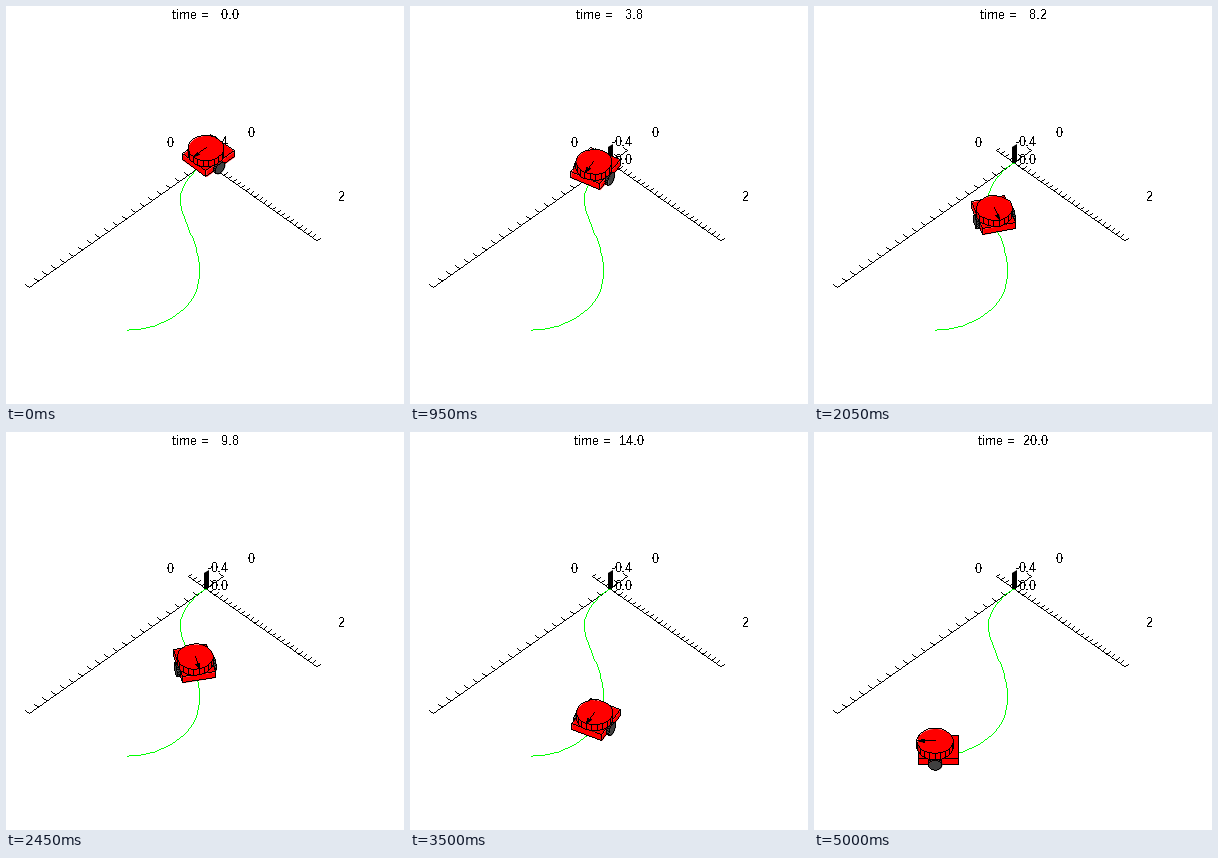
These frames come from a looping animation (398 by 398 pixels, 5050 ms). A matplotlib script:

```python
import numpy as np
import matplotlib.pyplot as plt
from matplotlib.animation import FuncAnimation
from matplotlib.collections import PolyCollection

plt.rcParams.update({"font.family": "Liberation Sans", "text.antialiased": False,
                     "text.hinting": "native", "text.hinting_factor": 1})

SIZE, DPI = 398, 100
FRAMES, INTERVAL, DT = 101, 50, 0.2
ORIGIN = np.array([200.0, 157.0])
H, V, Z = 44.2, 31.0, 45.0          # pixels per unit on screen
RED, GREY, GREEN, BLACK = "#ff0000", "#404040", "#00ff00", "#000000"

# screen points passed at equal time steps, and the speeds at both ends
KEYS = np.array([(200, 157), (186.6, 167.6), (174.5, 197.6), (190.1, 242.5),
                 (188.8, 288.2), (157.7, 316), (121, 324)])
V_START, V_END = (-0.7, 0.49), (-10.6, 0.0)
STEP = (FRAMES - 1) * DT / (len(KEYS) - 1)


def spline_slopes(p, v0, v1):
    """Knot velocities of the clamped cubic spline."""
    n = len(p)
    m = 4 * np.eye(n) + np.eye(n, k=1) + np.eye(n, k=-1)
    m[0], m[-1] = np.eye(n)[0], np.eye(n)[-1]
    inner = 3 * (p[2:] - p[:-2]) / STEP
    return np.linalg.solve(m, np.vstack([v0, inner, v1]))


SLOPES = spline_slopes(KEYS, V_START, V_END)


def motion(t):
    """Screen position and velocity at time t."""
    i = min(int(t / STEP), len(KEYS) - 2)
    u = t / STEP - i
    p, q = KEYS[i], KEYS[i + 1]
    a, b = SLOPES[i] * STEP, SLOPES[i + 1] * STEP
    c2, c3 = 3 * (q - p) - 2 * a - b, 2 * (p - q) + a + b
    return p + u * (a + u * (c2 + u * c3)), (a + u * (2 * c2 + 3 * u * c3)) / STEP


def project(p):
    """World points (x, y, z) to screen pixels."""
    x, y, z = np.asarray(p, float).T
    return np.column_stack([ORIGIN[0] + H * (y - x),
                            ORIGIN[1] + V * (x + y) - Z * z])


def pose(t):
    pos, vel = motion(t)
    u, v = (pos - ORIGIN) / (H, V)
    du, dv = vel / (H, V)
    return (v - u) / 2, (v + u) / 2, np.arctan2(dv + du, dv - du)


def line_pixels(points):
    """Pixels of a crisp polyline one pixel wide."""
    pts = np.floor(points)
    pixels = set()
    for a, b in zip(pts[:-1], pts[1:]):
        n = int(max(abs(b - a))) + 1
        steps = np.floor(np.linspace(a, b, n) + 0.5).astype(int)
        pixels.update(map(tuple, steps))
    return pixels


def squares(pixels):
    return [[(x, y), (x + 1, y), (x + 1, y + 1), (x, y + 1)] for x, y in pixels]


def circle(r, n):
    a = np.arange(n) * 2 * np.pi / n
    return np.column_stack([r * np.cos(a), r * np.sin(a)])


def upright(outline, low, high):
    return [np.array([(f, s, z) for f, s in outline]) for z in (low, high)]


def wheel(inner, outer, r=0.11):
    return [np.array([(b, s, r + a) for a, b in circle(r, 16)])
            for s in (inner, outer)]


BOX = [(0.27, -0.27), (0.27, 0.27), (-0.37, 0.27), (-0.37, -0.27)]
BODY = upright(BOX, 0.07, 0.2)
DISC = upright(circle(0.288, 20), 0.2, 0.335)
LEFT, RIGHT = wheel(0.27, 0.32), wheel(-0.32, -0.27)
SHAFT = np.array([(0, 0, 0.335), (0.28, 0, 0.335)])
HEAD = np.array([(0.28, 0, 0.335), (0.17, 0.03, 0.335), (0.17, -0.03, 0.335)])


def faces_of(solid):
    low, high = solid
    yield low[::-1]
    for i in range(len(low)):
        j = (i + 1) % len(low)
        yield np.array([low[i], low[j], high[j], high[i]])
    yield high


def faces_viewer(p):
    x, y = p.T
    return np.sum(x * np.roll(y, -1) - np.roll(x, -1) * y) < -0.2


def robot(t):
    """Faces and edge pixels from back to front, with their colours."""
    x, y, th = pose(t)
    c, s = np.cos(th), np.sin(th)
    polys, colors = [], []

    def place(p):
        return project(np.column_stack([x + c * p[:, 0] - s * p[:, 1],
                                        y + s * p[:, 0] + c * p[:, 1], p[:, 2]]))

    def add(faces, color):
        edges = set()
        for p in faces:
            edges |= line_pixels(np.vstack([p, p[:1]]))
        dots = squares(edges)
        # half a pixel keeps the fill under the middle of its edges
        polys.extend([p + 0.5 for p in faces] + dots)
        colors.extend([color] * len(faces) + [BLACK] * len(dots))

    far, near = (RIGHT, LEFT) if c > s else (LEFT, RIGHT)
    for solid, color in ((far, GREY), (BODY, RED), (near, GREY), (DISC, RED)):
        add([p for p in map(place, faces_of(solid)) if faces_viewer(p)], color)
    add([place(SHAFT), place(HEAD)], BLACK)
    return polys, colors


fig = plt.figure(figsize=(SIZE / DPI, SIZE / DPI), dpi=DPI, facecolor="white")
ax = fig.add_axes([0, 0, 1, 1])
ax.set(xlim=(0, SIZE), ylim=(SIZE, 0))
ax.axis("off")


def fill(polys, color, zorder):
    shapes = PolyCollection(polys, facecolors=color, edgecolors="none",
                            linewidths=0, zorder=zorder)
    return ax.add_collection(shapes)


def label(x, y, s, ha="left"):
    return ax.text(x, y, s, fontsize=13 * 72 / DPI, color=BLACK,
                   ha=ha, va="baseline", zorder=1)


def axis_pixels(start, stop, step, axis, tick):
    axis, tick = np.array(axis), np.array(tick)
    pixels = line_pixels(project([axis * start, axis * stop]))
    for k in range(round(start / step), round(stop / step) + 1):
        pixels |= line_pixels(project([axis * k * step, axis * k * step + tick]))
    return pixels


scale = axis_pixels(-0.4, 4, 0.2, (1, 0, 0), (0, -0.09, 0))
scale |= axis_pixels(-0.4, 2.5, 0.1, (0, 1, 0), (-0.08, 0, 0))
for y in (136, 154):
    scale |= line_pixels([(202, y), (204, y)])
fill(squares(scale), BLACK, 1)
fill([[(198, 141), (203, 138), (203, 155), (198, 158)]], BLACK, 1)

curve = [motion(t)[0] for t in np.linspace(0, (FRAMES - 1) * DT, FRAMES)]
fill(squares(line_pixels(curve)), GREEN, 2)

for x, y, s in ((161, 141, "0"), (242, 131, "0"), (332, 195, "2"),
                (205, 140, "0.4"), (205, 158, "0.0")):
    label(x, y, s)

caption = label(199.5, 13, "", ha="center")
car = fill([], BLACK, 5)


def draw(i):
    t = i * DT
    polys, colors = robot(t)
    car.set_verts(polys)
    car.set_facecolor(colors)
    caption.set_text(f"time = {t:5.1f}")
    return car, caption


anim = FuncAnimation(fig, draw, frames=FRAMES, interval=INTERVAL,
                     repeat=True, repeat_delay=0, blit=False)
plt.show()
```
